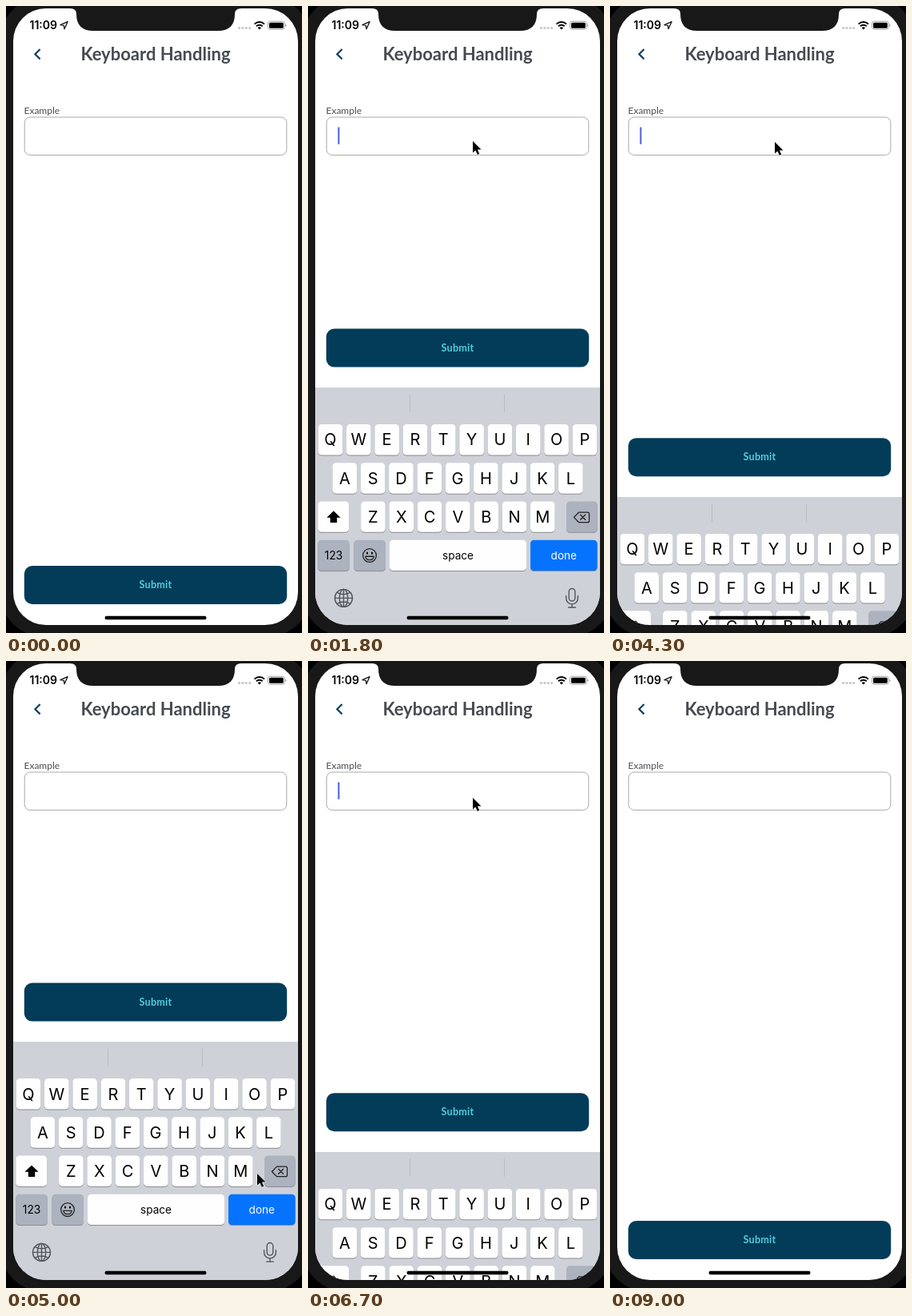
Recreate the animation shown at these times as an HTML page. Size 370 by 784 pixels, loop 9300 ms.

```html
<!DOCTYPE html>
<html lang="en">
<head>
<meta charset="utf-8">
<title>Keyboard Handling</title>
<style>
  html, body { margin: 0; width: 100%; height: 100%; overflow: hidden; background: #000; }
  svg { display: block; width: 370px; height: 784px; }
  .brand { font-family: Lato, "Open Sans", sans-serif; }
  .ui { font-family: Inter, Roboto, sans-serif; }
  .mid { text-anchor: middle; }
  .line { fill: none; stroke-linecap: round; stroke-linejoin: round; }
</style>
</head>
<body>
<svg viewBox="0 0 370 784">
  <defs>
    <clipPath id="screen"><rect x="9" y="3" width="356" height="771" rx="41"/></clipPath>
  </defs>
  <rect width="370" height="784" fill="#000"/>
  <rect x="-9" y="-13" width="392" height="803" rx="60" fill="#181818"/>

  <g clip-path="url(#screen)">
    <rect x="9" y="3" width="356" height="771" fill="#fff"/>

    <!-- status bar -->
    <text class="ui" x="29.5" y="29" font-size="14" font-weight="600">11:09</text>
    <path class="line" d="M77 19.7 68 23.7 72.3 24.4 73 28.7Z" stroke="#111" stroke-width="1.3"/>
    <g fill="#c6c6c6">
      <circle cx="291.5" cy="27.5" r="1.6"/><circle cx="295.9" cy="27.5" r="1.6"/>
      <circle cx="300.3" cy="27.5" r="1.6"/><circle cx="304.7" cy="27.5" r="1.6"/>
    </g>
    <g fill="none" stroke="#000" stroke-width="2">
      <path d="M310.6 22.6a9 9 0 0 1 12.4 0"/>
      <path d="M312.9 25.3a5.6 5.6 0 0 1 7.8 0"/>
    </g>
    <path d="M314.6 27.2a3.2 3.2 0 0 1 4.4 0L316.8 29.6Z"/>
    <rect x="327.5" y="19.2" width="20.8" height="10" rx="2.8" fill="none" stroke="#a3a3a3"/>
    <rect x="329" y="20.7" width="17.8" height="7" rx="1.5"/>
    <path d="M349.3 22.5a1.8 1.8 0 0 1 0 3.4Z" fill="#a3a3a3"/>

    <!-- page -->
    <path d="M42.6 54 36.4 60.2 42.6 66.4" fill="none" stroke="#0d4060" stroke-width="2.2"/>
    <text class="brand mid" x="187" y="68" font-size="22" font-weight="700" fill="#474a50">Keyboard Handling</text>
    <text class="brand" x="22.5" y="135" font-size="12" fill="#4b4e54">Example</text>
    <rect x="23.2" y="139" width="327.6" height="47.4" rx="7" fill="#fff" stroke="#a9a9a9"/>
    <rect id="caret" x="37.4" y="151.5" width="2" height="21.5" rx=".8" fill="#4a60cf"/>

    <g id="submit">
      <rect x="22.8" y="700" width="328.4" height="48" rx="10" fill="#033c59"/>
      <text class="brand mid" x="187" y="728.3" font-size="12.6" font-weight="700" letter-spacing=".25" fill="#52cddd">Submit</text>
    </g>

    <g id="keyboard">
      <rect x="9" y="476" width="356" height="310" fill="#ced1d8"/>
      <path d="M127.5 484.5V507M245.5 484.5V507" stroke="#b9bcc4"/>
      <g id="keys" class="ui mid"></g>
      <path d="M32 630.3 40.6 638.6H36.2V645H27.8V638.6H23.4Z" class="line" style="fill:#000"/>
      <g class="line" stroke="#222" stroke-width="1.3">
        <path d="M338.6 632H349.5a2 2 0 0 1 2 2V642.6a2 2 0 0 1-2 2H338.6L332.4 638.3Z"/>
        <path d="M340.6 635.2 346.6 641.2M346.6 635.2 340.6 641.2"/>
        <circle cx="77" cy="686" r="8.4"/>
        <path d="M71.8 687.2H82.2C81.8 693 72.2 693 71.8 687.2Z"/>
      </g>
      <ellipse cx="74" cy="683" rx="1.1" ry="1.6"/><ellipse cx="80" cy="683" rx="1.1" ry="1.6"/>
      <g class="line" stroke="#50555c" stroke-width="1.4">
        <circle cx="44.5" cy="739.3" r="11"/>
        <ellipse cx="44.5" cy="739.3" rx="5.2" ry="11"/>
        <path d="M44.5 728.3V750.3M33.5 739.3H55.5M36.3 732.4Q44.5 737 52.7 732.4M36.3 746.2Q44.5 741.6 52.7 746.2"/>
        <rect x="326.2" y="727.4" width="7.6" height="15.6" rx="3.8"/>
        <path d="M322.6 736.5V739.4a7.4 7.4 0 0 0 14.8 0V736.5M330 746.8V751M325.6 751H334.4"/>
      </g>
    </g>

    <rect x="123.5" y="762.8" width="127" height="4.4" rx="2.2"/>
    <path d="M80 0V3Q88 3 88 10C88 24 95 31 109 31H265C279 31 286 24 286 10Q286 3 294 3V0Z" fill="#181818"/>
  </g>

  <path id="cursor" d="M0 0V14.5L3.4 11.4 5.8 16.8 8.2 15.8 5.9 10.5H10.5Z" stroke="#fff" stroke-width="1" paint-order="stroke"/>
</svg>

<script>
const LOOP = 9300, STEP = 100, RISE = 298;
const byId = id => document.getElementById(id);
const caret = byId('caret'), submit = byId('submit'), keyboard = byId('keyboard'), cursor = byId('cursor');

// Keys
const WHITE = '#fefefe', GREY = '#acb2be', BLUE = '#0673fe';
let markup = '';
function key(x, y, w, fill, label = '', size = 20, ink = '#000') {
  const rect = (dy, color) =>
    `<rect x="${x}" y="${y + dy}" width="${w}" height="38.4" rx="4.5" fill="${color}"/>`;
  markup += rect(1, '#8b8d92') + rect(0, fill) +
    `<text x="${x + w / 2}" y="${y + 19.2 + size * 0.36}" font-size="${size}" fill="${ink}">${label}</text>`;
}
function row(letters, center, y) {
  [...letters].forEach((c, i) => key(center + i * 35.32 - 15.3, y, 30.6, WHITE, c));
}
row('QWERTYUIOP', 28, 522);
row('ASDFGHJKL', 45.8, 570.2);
row('ZXCVBNM', 81.4, 618.4);
key(12.3, 618.4, 38.8, WHITE);
key(323, 618.4, 38.6, GREY);
key(12.3, 666.6, 39.6, GREY, '123', 13.8);
key(57.4, 666.6, 39.6, GREY);
key(102, 666.6, 171, WHITE, 'space', 13.6);
key(278, 666.6, 83.6, BLUE, 'done', 13.6, '#fff');
byId('keys').innerHTML = markup;

// Times at which the keyboard opens and closes
const SESSIONS = [[1150, 2670], [4150, 5365], [6550, 7760]];

// Cursor path: time, x, y
const PATH = [
  [500, 298, 182], [800, 206, 169], [1900, 206, 169], [2400, 318, 680], [2750, 318, 680],
  [2900, 385, 640], [3100, 385, 420], [3250, 358, 330], [3700, 206, 171], [3900, 206, 171],
  [4000, 206, 170], [4550, 206, 170], [5000, 314, 641], [5150, 322, 680], [5450, 322, 680],
  [5800, 343, 652], [6300, 206, 171], [6750, 206, 171], [7200, 307, 674], [7850, 307, 674],
  [7950, 385, 640]
];

// Critically damped spring, 0 to 1
function spring(ms) {
  const a = Math.max(0, ms) * 0.012;
  return 1 - (1 + a) * Math.exp(-a);
}
const clamp = v => Math.min(1, Math.max(0, v));

function caretAlpha(ms) {
  const phase = ms % 1000;
  return phase < 900 ? clamp((820 - phase) / 140) : (phase - 900) / 100;
}

function cursorAt(t) {
  const i = PATH.findIndex(p => p[0] > t);
  if (i < 1) return null;
  const [t0, x0, y0] = PATH[i - 1], [t1, x1, y1] = PATH[i];
  const k = (t - t0) / (t1 - t0);
  return [x0 + (x1 - x0) * k, y0 + (y1 - y0) * k];
}

function draw(t) {
  let up = 0, alpha = 0;
  for (const [open, close] of SESSIONS) {
    if (t < open) break;
    up = spring(t - open) - spring(t - close);
    alpha = t < close ? caretAlpha(t - open) : 0;
  }
  keyboard.setAttribute('transform', `translate(0 ${(1 - up) * RISE})`);
  submit.setAttribute('transform', `translate(0 ${-up * (RISE - 0.5)})`);
  caret.setAttribute('opacity', alpha);

  const pos = cursorAt(t);
  cursor.setAttribute('visibility', pos ? 'visible' : 'hidden');
  if (pos) cursor.setAttribute('transform', `translate(${pos})`);
}

const start = performance.now();
function tick() {
  const t = (performance.now() - start) % LOOP;
  draw(Math.floor(t / STEP) * STEP);
  requestAnimationFrame(tick);
}
tick();
</script>
</body>
</html>
```
